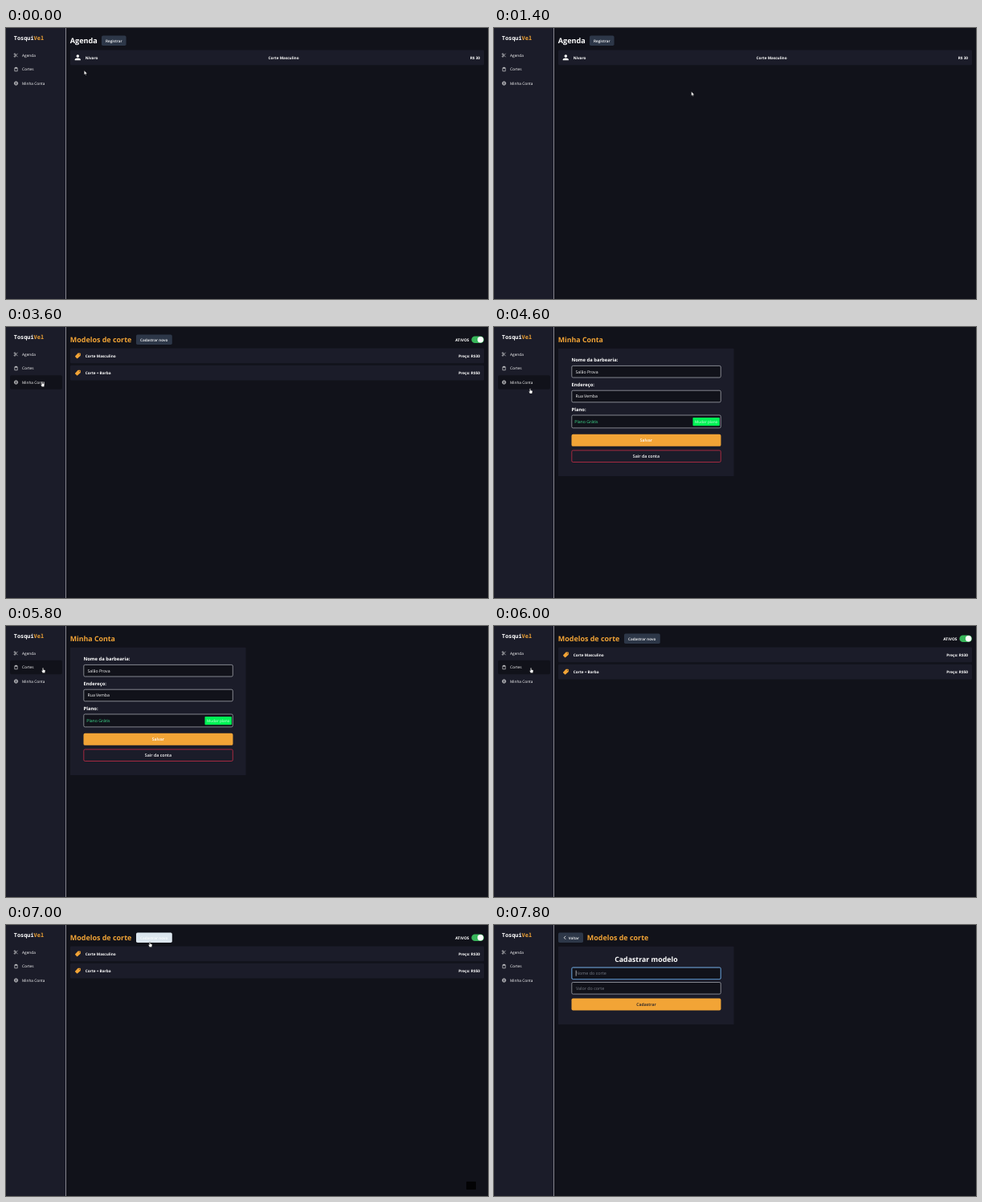
An HTML page for the animation above (8 s loop, 600x338 px).

```html
<!DOCTYPE html>
<html lang="pt-BR">
<head>
<meta charset="utf-8">
<title>Agenda</title>
<style>
  html, body { margin: 0; width: 100%; height: 100%; overflow: hidden; background: #11121a; }
  svg { display: block; width: 100vw; height: 100vh; }
  text { font-family: "Open Sans", "Noto Sans", sans-serif; text-rendering: geometricPrecision; white-space: pre; }
  .logo { font-family: "Noto Sans Mono", "DejaVu Sans Mono", monospace; }
</style>
</head>
<body>
<svg id="stage" viewBox="0 0 600 338"></svg>
<script>
const BG = '#11121a', PANEL = '#1b1c29', ORANGE = '#f2a436', GRAY = '#2d3748', LINE = '#b4b6be';

const text = (s, x, y, size = 4.7, weight = 700, fill = '#fff', anchor = 'start') =>
  `<text x="${x}" y="${y}" font-size="${size}" font-weight="${weight}" fill="${fill}" text-anchor="${anchor}">${s}</text>`;
const box = (x, y, w, h, fill, r = 1.25, more = '') =>
  `<rect x="${x}" y="${y}" width="${w}" height="${h}" rx="${r}" fill="${fill}" ${more}/>`;
const icon = (x, y, body, more = 'fill="none" stroke="#fff" stroke-width=".55"') =>
  `<g transform="translate(${x} ${y})" ${more}>${body}</g>`;
const group = (id, body) => `<g id="${id}">${body}</g>`;

// Form pieces share the same left edge and width
const field = (y, fill = BG, stroke = LINE, h = 14.6, more = '') =>
  box(96.8, y, 185.5, h, fill, 1.6, `stroke="${stroke}" stroke-width=".7" ${more}`);
const wide = (s, y, color) =>
  box(96.5, y, 186, 15, ORANGE, 1.9) + text(s, 189.4, y + 9.3, 5.2, 600, color, 'middle');

const tag = y => icon(89.4, y,
  '<path d="M.2-3.3H2.8Q3.4-3.3 3.4-2.7V-.2L-.5 3.3Q-1 3.6-1.4 3.2L-3.3 1.2Q-3.6.8-3.2.3Z"/>' +
  `<circle cx="2" cy="-1.9" r=".5" fill="${PANEL}"/>`, `fill="${ORANGE}"`);
const model = (name, price, y) =>
  box(80, y - 9.4, 515, 18.8, PANEL) + tag(y) + text(name, 98.7, y + 1.6) +
  text(`Preço: R$${price}`, 590, y + 1.6, 4.7, 700, '#fff', 'end');

const navY = [34, 51.5, 69];
const navIcons = [
  '<path d="M2-2.2L-1.1 1M2 2.2L-1.1-1"/><circle cx="-1.6" cy="-1.5" r=".75"/><circle cx="-1.6" cy="1.5" r=".75"/>',
  '<path d="M-1.7-1.7H1.7V2.3H-1.7ZM-.8-2.3H.8V-1.2H-.8Z"/>',
  '<circle r="2.1" stroke-width=".75"/><circle r=".8"/>'
];
const sidebar = box(0, 0, 75, 338, PANEL, 0) + box(74.2, 0, .8, 338, '#a0a1a8', 0) +
  box(5, 0, 65, 17.5, BG, 2, 'id="hover"') +
  `<text class="logo" x="9.8" y="15" font-size="6.9" font-weight="700" fill="#fff">Tosqui<tspan fill="${ORANGE}">Vel</tspan></text>` +
  ['Agenda', 'Cortes', 'Minha Conta'].map((s, i) =>
    icon(12.5, navY[i], navIcons[i]) + text(s, 20, navY[i] + 1.7, 4.77, 400)).join('');

const pages = {
  agenda: text('Agenda', 79.8, 19.3, 9.1) +
    box(119, 9.6, 30.6, 12.4, GRAY, 1.8) + text('Registrar', 124, 17.6, 4.7, 600) +
    box(80, 27.5, 515, 18.8, PANEL) +
    icon(89.3, 36.9, '<circle cy="-1.8" r="1.75"/><path d="M-3.5 3.3V2.4Q-3.2.7 0 .7T3.5 2.4V3.3Z"/>', 'fill="#fff"') +
    text('Nivaro', 98.7, 38.7) + text('Corte Masculino', 326.6, 38.7) +
    text('R$ 30', 590, 38.7, 4.7, 700, '#fff', 'end'),

  models: text('Modelos de corte', 79.8, 19.3, 8.95, 700, ORANGE) +
    box(162, 9.6, 44.8, 12.4, GRAY, 1.8, 'id="add"') + text('Cadastrar novo', 167, 17.6, 4.68, 600) +
    text('ATIVOS', 559.3, 17.6, 4.9) + box(579.4, 11.4, 15.6, 8.7, '#38b65a', 4.35) +
    '<circle cx="590.6" cy="15.75" r="3.7" fill="#fff"/>' +
    model('Corte Masculino', 30, 35.9) + model('Corte + Barba', 50, 57.1),

  account: text('Minha Conta', 79.8, 19.3, 8.8, 700, ORANGE) + box(80, 26.8, 218.6, 159.2, PANEL, 0) +
    text('Nome da barbearia:', 96.5, 43.4, 5.84) + field(48.4) + text('Salão Prova', 101.5, 57.7, 5.2, 400) +
    text('Endereço:', 96.5, 74, 5.84) + field(79.2) + text('Rua Vemba', 101.5, 88.4, 5.2, 400) +
    text('Plano:', 96.5, 104.7, 5.84) + field(110, BG, LINE, 15.9) +
    text('Plano Grátis', 100.3, 119.7, 5.2, 400, '#3fe08f') +
    box(247.5, 113, 33.4, 10.2, '#00f355', .8) + text('Mudar plano', 250, 119.7, 4.75, 400, '#d4ffdf') +
    wide('Salvar', 133.8, '#fff') + field(153.9, PANEL, '#e0324b') +
    text('Sair da conta', 189.4, 163.1, 5.3, 600, '#fff', 'middle'),

  form: box(80, 9.6, 31, 12.4, GRAY, 1.8) + icon(88.2, 15.8, '<path d="M1-2L-1 0L1 2"/>', 'fill="none" stroke="#fff" stroke-width=".8"') +
    text('Voltar', 92.8, 17.5, 4.5, 600) + text('Modelos de corte', 115.8, 19.3, 8.95, 700, ORANGE) +
    box(80, 26.8, 218.6, 97.2, PANEL, 0) +
    text('Cadastrar modelo', 189.4, 45.6, 8.8, 700, '#fff', 'middle') +
    field(53) + field(71.5) +
    group('focus', field(53, 'none', '#3c8fdc', 14.6) + box(101.8, 56.6, .6, 7, '#fff', 0)) +
    text('Nome do corte', 102, 62.2, 5.4, 400, '#777c86') + text('Valor do corte', 102, 80.8, 5.4, 400, '#777c86') +
    wide('Cadastrar', 91.5, PANEL)
};

const skin = 'fill="#fff" stroke="#000" stroke-width=".3"';
stage.innerHTML = box(0, 0, 600, 338, BG, 0) + sidebar +
  Object.entries(pages).map(([id, body]) => group(id, body)).join('') +
  box(573, 320, 12, 10, '#030305', .8, 'id="busy"') +
  group('cursor',
    `<path id="arrow" ${skin} d="M0 0V5.3L1.2 4.2L2 6L2.8 5.7L2 3.9H3.7Z"/>` +
    `<path id="hand" ${skin} d="M-.6 .5Q0-.3 .6 .5V2.4L2.6 2.9Q3 3 2.9 3.8L2.4 6.4H-.4L-1.7 4Q-1.6 3.2-.6 3.8Z"/>`);

const LOOP = 8000, STEP = 200;
// Pointer keys: time, x, y
const path = [
  [0, 97.3, 53], [400, 194.5, 66], [1200, 194.5, 66], [1800, 348, 106], [2200, 208.7, 66],
  [2400, 110, 57], [2600, 24.5, 49], [3000, 24.5, 49], [3600, 45, 68], [4400, 45, 68],
  [4600, 45, 76.6], [5200, 235, 122], [5800, 46, 52], [6000, 46, 52], [6800, 179, 21],
  [7200, 179, 21], [7600, 165, 58], [LOOP, 165, 58]
];
const schedule = [[0, 'agenda'], [3000, 'models'], [4600, 'account'], [6000, 'models'], [7200, 'form']];

const $ = id => document.getElementById(id);
const show = (id, on) => $(id).setAttribute('visibility', on ? 'visible' : 'hidden');

function pointer(t) {
  const i = path.findIndex(k => k[0] > t);
  const [t0, x0, y0] = path[i - 1], [t1, x1, y1] = path[i];
  const p = (t - t0) / (t1 - t0);
  return [x0 + (x1 - x0) * p, y0 + (y1 - y0) * p];
}

function draw(now) {
  const t = Math.floor(now % LOOP / STEP) * STEP;
  const page = schedule.findLast(s => s[0] <= t)[1];
  const [x, y] = pointer(t);
  const nav = x < 70 ? navY.findIndex(c => Math.abs(y - c) < 8.75) : -1;
  const onAdd = page === 'models' && x > 162 && x < 207 && y < 22;
  const typing = t >= 7600;

  for (const id in pages) $(id).style.display = id === page ? '' : 'none';
  show('hover', nav >= 0);
  if (nav >= 0) $('hover').setAttribute('y', navY[nav] - 8.75);
  $('add').setAttribute('fill', onAdd ? '#dce6ee' : GRAY);
  show('focus', typing);
  show('busy', t >= 6800 && t < 7200);
  $('cursor').setAttribute('transform', `translate(${x} ${y})`);
  show('hand', !typing && (nav >= 0 || onAdd));
  show('arrow', !typing && nav < 0 && !onAdd);
  requestAnimationFrame(draw);
}
draw(0);
</script>
</body>
</html>
```
